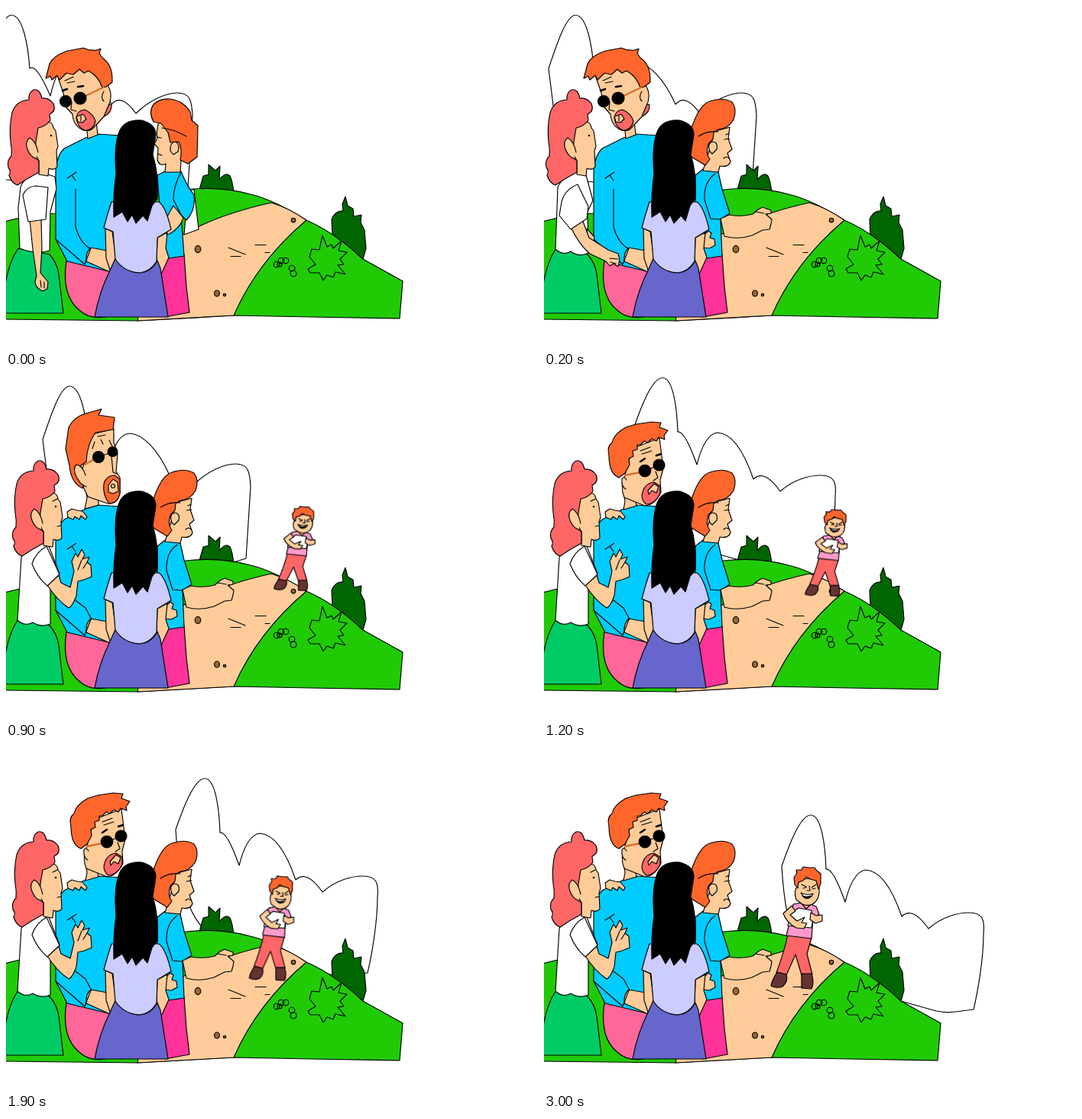
Write an HTML page that moves like this. It is 696x450 px and loops after 3800 ms.

```html
<!DOCTYPE html>
<html lang="en">
<head>
<meta charset="utf-8">
<title>Family on the hill</title>
<style>
html, body { margin: 0; width: 100%; height: 100%; overflow: hidden; background: #fff; }
svg { display: block; width: 696px; height: 450px; }
path, circle, ellipse { stroke: #000; stroke-width: 1.15; stroke-linejoin: round; stroke-linecap: round; }
.line { fill: none; }
.ink { fill: #000; }
.thick { fill: none; stroke-width: 2.6; }
.white { fill: #fff; }
.skin { fill: #fc9; }
.hair { fill: #ff662b; }
.rose { fill: #f66; }
.blue { fill: #0cf; }
.grass { fill: #20cb06; }
.bush { fill: #060; }
.stone { fill: #963; }
.shoe { fill: #633; }
.strap { fill: none; stroke: #d8702a; stroke-width: 2.4; }
.kid path { vector-effect: non-scaling-stroke; }

.step { animation: 3800ms step-end infinite; }
.turned { animation-name: turned; }
.early { animation-name: early; }
.ready { animation-name: ready; }
.hang { animation-name: hang; }
.reach { animation-name: reach; }
.worry { animation-name: worry; }
.calm { animation-name: calm; }
.gasp { animation-name: gasp; }
.stare { animation-name: stare; }
.cloud { animation-name: drift; }
.kid { animation-name: approach; }

@keyframes turned { 0% { visibility: visible } 2.632%, 100% { visibility: hidden } }
@keyframes ready { 0% { visibility: hidden } 2.632%, 100% { visibility: visible } }
@keyframes hang { 0% { visibility: visible } 5.263%, 100% { visibility: hidden } }
@keyframes reach { 0% { visibility: hidden } 5.263% { visibility: visible } 13.158%, 100% { visibility: hidden } }
@keyframes worry { 0% { visibility: hidden } 13.158%, 100% { visibility: visible } }
@keyframes calm { 0% { visibility: visible } 13.158%, 100% { visibility: hidden } }
@keyframes gasp { 0% { visibility: hidden } 13.158% { visibility: visible } 31.579%, 100% { visibility: hidden } }
@keyframes stare { 0% { visibility: hidden } 31.579%, 100% { visibility: visible } }
@keyframes early { 0% { visibility: visible } 31.579%, 100% { visibility: hidden } }
@keyframes drift {
  0% { transform: translate(7px, 12px) }
  2.632% { transform: translate(24px, 12px) }
  5.263% { transform: translate(41px, 12px) }
  13.158% { transform: translate(83px, 12px) }
  31.579% { transform: translate(155px, 1px) }
  39.474% { transform: translate(223px, 16px) }
  50% { transform: translate(260px, 40px) }
  65.789% { transform: translate(304px, 52px) }
  78.947%, 100% { transform: translate(349px, 88px) }
}
@keyframes approach {
  0% { visibility: hidden; transform: translate(389px, 170px) scale(.8, .69) }
  23.684% { visibility: visible; transform: translate(389px, 170px) scale(.8, .69) }
  31.579% { visibility: visible; transform: translate(381px, 174px) scale(.82, .71) }
  39.474% { visibility: visible; transform: translate(373px, 179px) scale(.85, .74) }
  50% { visibility: visible; transform: translate(360px, 168px) scale(.87, .857) }
  65.789% { visibility: visible; transform: translate(350px, 165px) scale(.97, .89) }
  78.947%, 100% { visibility: visible; transform: translate(345px, 156px) }
}
</style>
</head>
<body>
<svg viewBox="0 0 696 450">
  <defs>
    <g id="momHead">
      <path class="skin" d="M42 156Q60 146 62 160L65 164L68 184L66 190L67 211Q63 216 56 213L55 223L43 221L43 203L36 190Z"/>
      <path class="rose" d="M36 110Q29 114 30 123Q13 124 8 140Q4 158 6 178Q8 188 7 197Q1 202 3 212Q7 216 4 222Q7 232 15 235Q28 226 43 218L43 203L38 199L39 178L42 160Q52 158 58 150L57 142Q66 138 62 128Q56 120 47 121Q44 108 36 110Z"/>
      <path class="skin" d="M42 192Q39 177 31 173Q24 178 28 188Q32 198 39 200"/>
      <circle class="ink" cx="59" cy="170" r=".7"/>
    </g>
    <path id="skirt" d="M16 318L57 326Q67 337 69 352L75 403L-2 403L-1 365Q4 335 16 318Z" fill="#0c6"/>
  </defs>

  <g class="step cloud">
    <path class="step early white" d="M-35 70C-25 40-12 0 0 0C15 0 22 40 24 70Q32 62 51 106Q61 62 79 62C96 63 116 83 131 117Q144 102 163 129C181 111 203 102 217 102C234 102 236 112 237 132L231 226L215 231L150 232L-15 215L-25 150Z"/>
    <path class="step stare white" d="M-38 67C-29 41-14 0 0 0C14 0 19 40 20 71Q29 69 45 114Q55 74 72 72C90 73 105 92 119 133Q133 119 154 149C172 133 193 128 207 128C224 128 228 136 226 156C226 190 218 234 213 255L190 258Q178 260 164 257L29 219C-10 200-32 170-38 67Z"/>
  </g>

  <path class="bush" d="M253 241L258 223L265 221L265 208L274 216L280 210L279 228Q287 217 293 223Q296 228 298 245Z"/>
  <path class="bush" d="M427 302L426 280Q431 268 441 269L440 260L444 250L447 262L454 266L455 276L465 274L464 284L469 294L471 318L467 332Z"/>
  <path class="grass" d="M-2 283Q28 274 64 272L150 256L235 241Q280 236 320 247Q350 254 393 281Q430 297 467 332L519 361L515 410L400 408L298 406L172 413L-2 411Z"/>
  <path class="skin" d="M347 258Q370 265 393 281Q329 335 298 406L172 413L190 320L235 298Q280 273 347 258Z"/>
  <g class="stone">
    <ellipse cx="251" cy="319" rx="3.8" ry="4.6"/>
    <circle cx="376" cy="281" r="2.8"/>
    <ellipse cx="276" cy="377" rx="3.4" ry="4"/>
    <circle cx="286" cy="379" r="1.7"/>
  </g>
  <path class="line" d="M291 317L313 326M294 328.5H307M326 313.5H340M339 323.5H345"/>
  <path class="line" d="M395 345L405 339L397 329L400 319L410 320L414 301L420 316L426 313L428 318L439 308L435 321L446 323L437 332L442 339L434 340L444 352L431 349L428 356L420 353L415 360L410 350L398 350Z"/>
  <g class="line">
    <circle cx="354" cy="339" r="3.8"/><circle cx="360" cy="334" r="3.8"/><circle cx="366" cy="334" r="3.8"/>
    <circle cx="358" cy="339" r="3"/><circle cx="374" cy="344" r="3.8"/><circle cx="376" cy="351" r="4"/>
  </g>
  <path class="step turned white" d="M238 241H246L252 293L233 300Z"/>

  <g class="step kid"><g transform="translate(-345 -156)">
    <path class="rose" d="M319 245L350 249L344 270L351 297L337 298L329 271L317 298L304 295Q314 268 319 245Z"/>
    <path class="shoe" d="M305 294L317 297Q320 306 312 313Q304 316 297 312Q298 305 305 294Z"/>
    <path class="shoe" d="M337 296L350 296Q354 308 350 316L337 315Z"/>
    <path class="skin" d="M336 200L347 205L346 212L335 210Z"/>
    <path fill="#f9c" d="M326 205L336 203L343 211L349 205L356 208L360 218L352 224L350 250L317 246L322 226Z"/>
    <path class="white" d="M323 216L333 210L350 213L352 224L350 236L319 233Z"/>
    <path class="skin" d="M324 207L313 217Q317 229 330 236L340 237L344 230L337 229L341 222L331 227L322 219L329 214Z"/>
    <path class="skin" d="M349 216L356 220L364 219L364 227L355 230L348 225Z"/>
    <path class="skin" d="M332 177Q344 167 357 174L360 184Q361 195 355 202Q348 209 338 205L330 199Q326 188 332 180Z"/>
    <path class="hair" d="M332 184L328 179L327 170L331 164L330 160L337 160L339 156L347 157L354 157L357 161L362 165L362 178L359 185L356 174L348 172L343 169L339 174L333 176Z"/>
    <path class="white" d="M336 190Q344 194 352 191Q349 199 341 197Z"/>
    <path fill="#c33" d="M338 194Q344 196 349 194Q344 199 338 194Z"/>
    <path class="line" d="M337 179L343 182M350 183L356 179M347 181L348 187L344 187M339 184L343 183M351 185L355 184"/>
  </g></g>

  <path fill="#f39" d="M201 328L233 326L236 368L240 402L208 408Z"/>
  <g class="step turned">
    <path class="blue" d="M198 222L208 217H229Q236 235 246 248Q248 269 236 281L229 274L233 328L206 332Z"/>
    <path class="line" d="M229 218Q219 236 219 254L229 274"/>
    <path class="skin" d="M219 262L232 278Q228 291 214 299L208 300L206 285Z"/>
    <path class="skin" d="M200 152Q196 165 198 173L194 181L199 186L198 202Q201 211 209 207L208 218H228L229 203L236 178L230 164Z"/>
    <path class="hair" d="M193 152Q186 139 193 129Q201 121 215 122Q233 125 241 139L243 150L251 157L250 198L238 207L228 202Q231 187 226 178L215 179L212 166L203 154Z"/>
    <path class="skin" d="M215 190Q214 179 222 178Q228 182 225 191L219 195Z"/>
    <path class="line" d="M204 160Q221 162 236 171M198 172L203 173M199 194L204 196"/>
  </g>
  <g class="step ready">
    <path class="blue" d="M198 222L208 214L228 218L233 240L243 272L231 280L233 328L206 332L198 280Z"/>
    <path class="line" d="M224 220Q209 230 210 254L218 279L231 280"/>
    <path class="skin" d="M231 279L242 274Q258 277 273 273L280 267L286 264L297 268L297 272L290 273L298 280L297 286L295 293L286 294L272 301Q253 307 236 302Z"/>
    <path class="line" d="M277 270L288 272"/>
    <path class="skin" d="M221 165L243 159L241 174L246 188L240 193L244 204Q242 212 230 210L228 218L208 216L216 190Z"/>
    <path class="hair" d="M188 195L190 172L194 157Q204 129 217 125Q234 119 246 126Q253 135 248 149Q241 161 228 162L222 166L221 175L215 181Q211 194 217 201L211 209Z"/>
    <path class="line" d="M202 171Q215 163 228 165M236 175L243 174M238 169L242 167M235 200Q239 196 242 200"/>
    <path class="skin" d="M217 191Q213 181 220 178Q228 178 226 188L220 194Z"/>
    <path class="skin" d="M206 303L215 295L219 298L217 304L223 306L224 314L216 318L209 317Z"/>
  </g>

  <path fill="#f69" d="M79 334L134 346L150 360L130 408Q109 411 97 400Q72 381 79 334Z"/>
  <path class="blue" d="M104 173L121 168L150 170V340L134 348L80 335L65 306V215Q67 195 76 187Z"/>
  <path class="skin" d="M111 317L138 322L136 349L105 335Q104 323 111 317Z"/>
  <path class="line" d="M80 226L92 218M86 222L91 229M65 306L103 339L111 318"/>
  <path class="step calm line" d="M91 240V290Q97 311 110 318"/>
  <path class="step worry line" d="M91 293L104 303L112 318"/>

  <g class="step calm">
    <path class="skin" d="M105 154L107 174L120 169L118 151Z"/>
    <path class="rose" d="M131 130L138 129Q139 140 128 145Z"/>
    <path class="skin" d="M66 88L75 114L78 132L87 142Q88 157 101 163Q111 166 117 157L128 145L136 126Q139 114 134 106L126 75H80Z"/>
    <path class="hair" d="M52 95L57 76Q62 65 80 59L101 55Q110 59 118 58L124 56L122 62L126 68Q140 77 139 100L131 106L126 107Q121 92 108 85L102 88L96 83L88 90L79 88L70 97L67 91L60 97L58 92Z"/>
    <path class="rose" d="M92 147Q93 137 103 136Q114 141 117 151Q114 164 103 163Q94 160 92 147Z"/>
    <path class="skin" d="M92 145L101 142L105 148L100 153L94 152Z"/>
    <path class="strap" d="M104 118L127 107"/>
    <circle class="ink" cx="78" cy="125" r="7.5"/><circle class="ink" cx="97" cy="121" r="8"/>
    <path class="thick" d="M74 111L80 109M94 106L101 105"/>
    <path class="line" d="M77 98L88 93M80 101L90 99M86 126L85 136L92 138M98 144V151M128 112Q123 120 128 125"/>
  </g>
  <g class="step gasp">
    <path class="skin" d="M104 144L106 159L103 173L121 168V156Z"/>
    <path class="skin" d="M110 76L141 68L141 86L146 101L144 124L149 132L149 152Q143 166 133 166L107 157L97 135Z"/>
    <path class="hair" d="M78 94L82 66Q89 52 104 48L125 42L121 50L142 53L140 69L117 73Q106 88 105 111L98 116L103 136L100 146Q85 139 83 116Z"/>
    <path class="skin" d="M104 129Q100 116 92 115Q87 120 92 131L98 140L105 144"/>
    <path class="hair" d="M128 140Q131 129 142 129L149 134V153Q146 166 135 166Q126 154 128 140Z"/>
    <path class="skin" d="M134 142L140 134L146 138L147 150L140 153L134 151Z"/>
    <circle class="line" cx="140" cy="143" r="2.5"/>
    <path class="strap" d="M103 115L117 107"/>
    <circle class="ink" cx="121" cy="105" r="7.5"/><circle class="ink" cx="139.5" cy="98" r="6.5"/>
    <path class="line" d="M121 105L140 98M113 94L116 85M120 78L130 76M124 82L127 88M138 104L140 125L145 127M135 83L139 91"/>
  </g>
  <g class="step stare">
    <path class="skin" d="M104 150L106 163L104 174L121 169L118 154Z"/>
    <path class="skin" d="M115 94L151 80L154 104L156 120L152 135L153 151Q145 168 132 169L105 158Q99 144 106 128Z"/>
    <path class="hair" d="M85 103Q82 91 89 86Q91 75 107 66L120 62L140 59L153 60L151 66L162 70L157 77L158 82L150 79L147 84L141 81L136 86L131 84L126 89L122 89L122 95L116 97L117 104L111 107L112 115L106 126L98 132Q85 127 85 103Z"/>
    <path class="skin" d="M108 135Q104 129 102 134Q101 144 107 147"/>
    <path class="rose" d="M128 155Q131 139 144 138L152 143V153Q145 167 134 167Q128 163 128 155Z"/>
    <path class="skin" d="M136 149L144 140L150 144L147 152L141 149L137 154Z"/>
    <path class="strap" d="M106 129L126 125"/>
    <circle class="ink" cx="132" cy="123" r="7.8"/><circle class="ink" cx="150.5" cy="115.5" r="7.5"/>
    <path class="thick" d="M126 111L132 107M147 103L153 101"/>
    <path class="line" d="M126 97L139 92M128 101L141 97M132 123L150 116M146 124L149 132L143 136"/>
  </g>

  <path class="skin" d="M130 292L139 296L144 332L137 349L131 331Z"/>
  <path class="skin" d="M198 304L211 297L209 318L213 330L202 354L197 335Z"/>
  <path fill="#66c" d="M144 329Q156 350 175 350Q190 349 198 334L202 344L212 408L116 408Q122 375 136 347Z"/>
  <path fill="#ccf" d="M138 257Q132 275 128 291L140 296L143 332Q154 349 175 350Q188 349 197 335L198 304L216 293Q209 263 200 257Z"/>
  <path class="ink" d="M147 168Q153 148 178 150Q196 155 196 169L192 195Q200 220 198 253L191 262L185 282L179 275L170 285L165 274L159 283L152 270L141 277Q140 246 144 220Q141 188 147 168Z"/>

  <g class="step hang">
    <use href="#skirt"/>
    <path class="white" d="M43 217Q24 223 19 238L16 265L18 318Q38 326 57 321L58 270L66 240L64 224Z"/>
    <path class="skin" d="M31 280L46 279L47 318L45 350L55 362L54 371L48 374Q38 370 38 361L40 354L35 319Z"/>
    <path class="white" d="M22 248Q27 237 39 236L55 238L52 280L29 283Z"/>
    <path class="line" d="M45 360L46 369M50 362V370"/>
    <use href="#momHead"/>
  </g>
  <g class="step reach">
    <use href="#skirt"/>
    <path class="white" d="M43 217Q24 223 18 238L15 319Q25 328 35 322Q46 330 58 324L57 270L64 255L55 222Z"/>
    <path class="skin" d="M56 292L66 303L65 310L57 306Z"/>
    <path class="skin" d="M36 292L50 280L59 304L84 320L97 325L99 332L97 342L91 338L86 341L81 335L60 325Q46 313 36 292Z"/>
    <path class="white" d="M44 234Q27 241 23 257L20 275L35 293L56 279L58 263Z"/>
    <path class="line" d="M86 331L97 332M87 336L94 338"/>
    <use href="#momHead"/>
  </g>
  <g class="step worry">
    <path class="skin" d="M81 184L80 177L86 173L93 175L100 176L106 183L104 187L98 182L96 187L90 183L88 187Z"/>
    <use href="#skirt"/>
    <path class="white" d="M45 217Q25 222 20 237L15 319Q25 328 35 322Q46 329 58 324V273L70 258L56 222Z"/>
    <path class="skin" d="M54 273L69 260L72 270L84 276L89 255L86 242L91 231L94 236L99 226L103 233L100 239L109 236L106 243L111 247L112 262L102 266L94 268L92 287Q87 301 82 303Q67 293 54 273Z"/>
    <path class="white" d="M53 222Q39 230 34 245Q41 263 54 274L70 259Z"/>
    <path class="line" d="M99 240L94 253M106 243L101 251"/>
    <g transform="translate(6 0)">
      <use href="#momHead"/>
      <path class="line" d="M55 163L61 160M61 196L66 195"/>
    </g>
  </g>
</svg>
</body>
</html>
```
